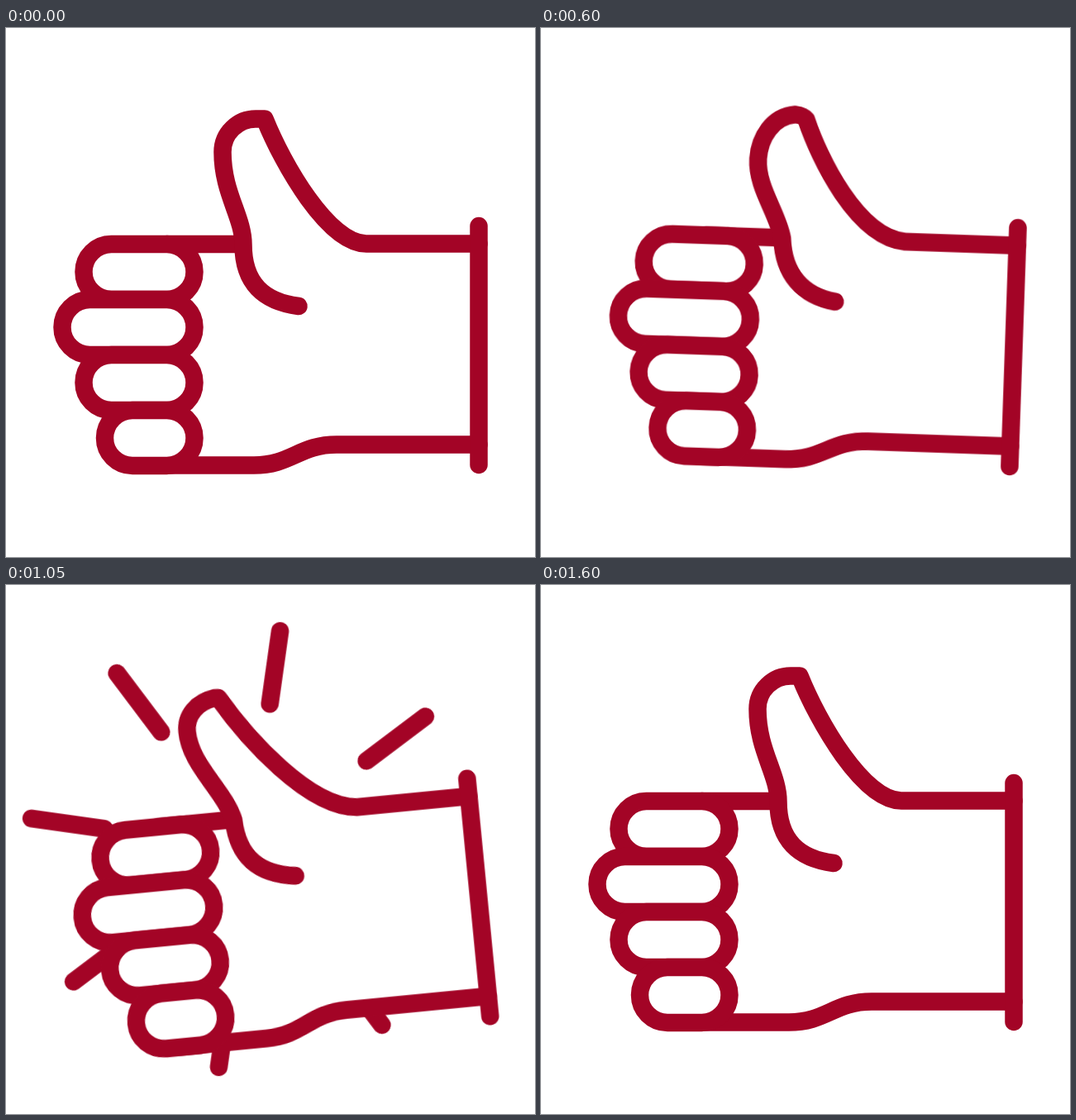
These frames come from a looping animation (640 px wide and 640 px high, 1.65 s). An HTML page:

```html
<!DOCTYPE html>
<html lang="en">
<head>
<meta charset="utf-8">
<title>Thumbs up</title>
<style>
  html, body { margin: 0; width: 100%; height: 100%; overflow: hidden; background: #fff; }
  svg { display: block; width: 100%; height: 100%; }

  svg {
    fill: #fff;
    stroke: #a30426;
    stroke-width: 21.5;
    stroke-linecap: round;
    stroke-linejoin: round;
    --ease: cubic-bezier(.37, 0, .63, 1);
  }
  .hand, .thumb, .fingers rect, .rays line {
    animation: 1650ms var(--ease) infinite;
  }
  .line { fill: none; }

  .hand { transform-origin: 510px 383.5px; animation-name: swing; }
  @keyframes swing {
    0%, 89.7%, 100% { transform: rotate(0deg); }
    29.09% { transform: rotate(-12deg); }
    45.9% { transform: rotate(23deg); }
    61.82% { transform: rotate(-6deg); }
    75.76% { transform: rotate(4.5deg); }
  }

  .thumb { animation-name: bend; }
  @keyframes bend {
    0%, 84.85%, 100% {
      d: path("M354 336.5C312 331 287 309 287 262C287 228 262 200 262 150C262 127 281 110 302 110C306 110 309 110 313 110C335 165 390 261 436 261L572 261");
    }
    29.09% {
      d: path("M354 336.5C312 331 287 309 286 262C277 225 238 190 238 150C238 130 253 117 275 113C276 113 277 113 278 113C309 165 377 256 436 261L572 261");
    }
    46.67% {
      d: path("M354 336.5C320 331 296 300 290 262C287 240 282 222 284 195C287 160 300 112 337 110C351 111 363 116 369 125.5C362 160 378 258 436 261L572 261");
    }
    64.85% {
      d: path("M354 336.5C312 331 287 309 286 262C278 225 240 191 240 150C240 130 255 116 277 113C278 113 279 113 281 113C311 165 378 256 436 261L572 261");
    }
  }

  /* The fingers grip and let go one after another. */
  .fingers rect:nth-child(1) { --grip: 27px; animation-name: grip1; }
  .fingers rect:nth-child(2) { --grip: 24.5px; animation-name: grip2; }
  .fingers rect:nth-child(3) { --grip: 25.5px; animation-name: grip3; }
  .fingers rect:nth-child(4) { --grip: 25.5px; animation-name: grip4; }
  @keyframes grip1 {
    0%, 78.2%, 100% { transform: none; }
    30.3%, 63% { transform: translateX(var(--grip)); }
  }
  @keyframes grip2 {
    0%, 2.7%, 79.5%, 100% { transform: none; }
    33%, 64.4% { transform: translateX(var(--grip)); }
  }
  @keyframes grip3 {
    0%, 5.5%, 80.8%, 100% { transform: none; }
    35.8%, 65.7% { transform: translateX(var(--grip)); }
  }
  @keyframes grip4 {
    0%, 8.2%, 82.2%, 100% { transform: none; }
    38.5%, 67% { transform: translateX(var(--grip)); }
  }

  /* Each ray shoots out from the centre, then shrinks to its outer end. */
  .rays line { animation-name: burst; }
  @keyframes burst {
    0%, 33.93% { opacity: 0; stroke-dasharray: 0px 999px; stroke-dashoffset: 0px; }
    33.94% { opacity: 1; stroke-dasharray: 0px 999px; stroke-dashoffset: 0px; }
    47.88% {
      opacity: 1; stroke-dasharray: 249.5px 999px; stroke-dashoffset: -17px;
      animation-timing-function: cubic-bezier(.32, .18, .6, 1);
    }
    78.06% { opacity: 1; stroke-dasharray: 0.1px 999px; stroke-dashoffset: -266.4px; }
    78.07%, 100% { opacity: 0; stroke-dasharray: 0.1px 999px; stroke-dashoffset: -266.4px; }
  }
</style>
</head>
<body>
<svg viewBox="0 0 640 640">
  <g class="rays" transform="translate(294.5 319.5) rotate(8)">
    <line x2="266.5" transform="rotate(45)"/>
    <line x2="266.5" transform="rotate(90)"/>
    <line x2="266.5" transform="rotate(135)"/>
    <line x2="266.5" transform="rotate(180)"/>
    <line x2="266.5" transform="rotate(225)"/>
    <line x2="266.5" transform="rotate(270)"/>
    <line x2="266.5" transform="rotate(315)"/>
  </g>
  <g class="hand">
    <path stroke="none" d="M195 261.5H572V504H400C355 504 345 529 300 529H195Z"/>
    <path class="line" d="M195 261.5H287M195 529H300C345 529 355 504 400 504H572"/>
    <path class="thumb" d="M354 336.5C312 331 287 309 287 262C287 228 262 200 262 150C262 127 281 110 302 110C306 110 309 110 313 110C335 165 390 261 436 261L572 261"/>
    <path class="line" d="M572 239.5V528.5"/>
    <g class="fingers">
      <rect x="94" y="261.5" width="134" height="67" rx="33.5"/>
      <rect x="68" y="328.5" width="160" height="67" rx="33.5"/>
      <rect x="94" y="395.5" width="134" height="67" rx="33.5"/>
      <rect x="119.5" y="462.5" width="108.5" height="67" rx="33.5"/>
    </g>
  </g>
</svg>
</body>
</html>
```
